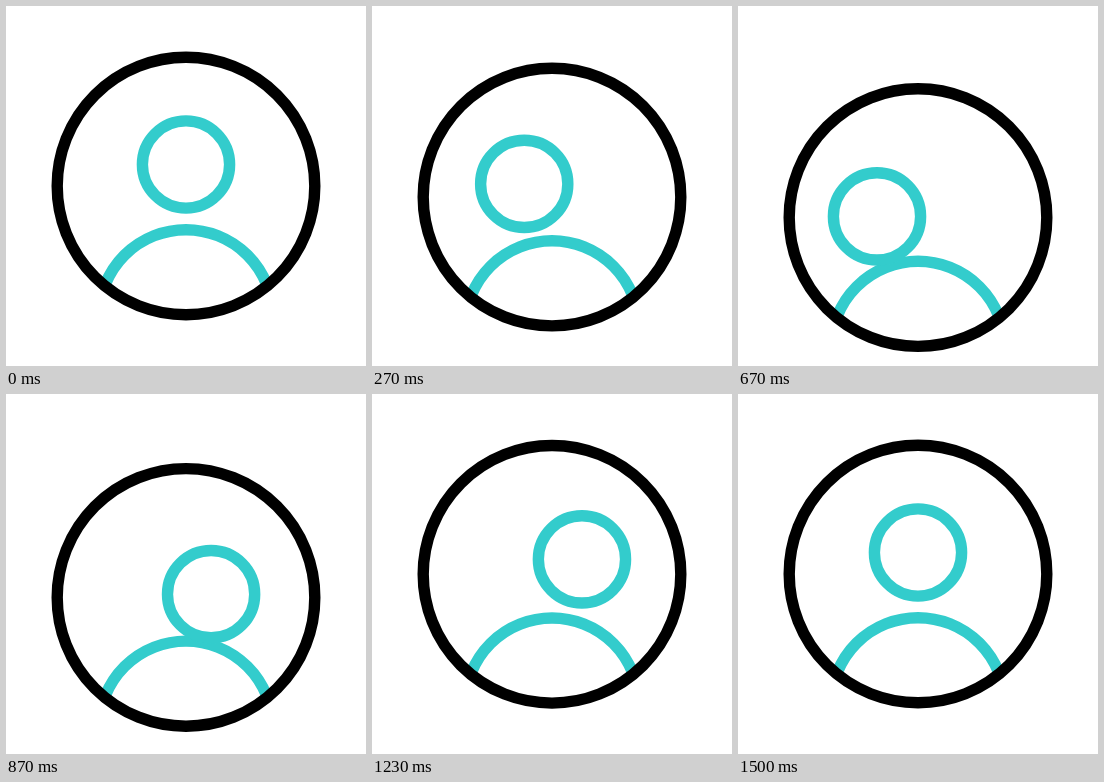
Write an HTML page that moves like this. It is 360 px wide and 360 px high and loops after 2 s.

```html
<!DOCTYPE html>
<html lang="en">
<head>
<meta charset="utf-8">
<title>Avatar</title>
<style>
  html, body { margin: 0; width: 100%; height: 100%; overflow: hidden; background: #fff; }
  svg { display: block; width: 100%; height: 100%; }
  circle { fill: none; stroke-width: 11.4; }
  .teal { stroke: #33cccc; }
  .ring { stroke: #000; }
</style>
</head>
<body>
<svg viewBox="0 0 360 360">
  <clipPath id="disc"><circle cx="180" cy="180" r="128"/></clipPath>
  <g id="badge">
    <g clip-path="url(#disc)"><circle class="teal" cx="180" cy="310.6" r="86.9"/></g>
    <circle class="teal" id="head" cx="180" cy="158.5" r="43.6"/>
    <circle class="ring" cx="180" cy="180" r="128.8"/>
  </g>
</svg>
<script>
  const LOOP = 2000, FPS = 30;
  const badge = document.getElementById('badge');
  const head = document.getElementById('head');

  // Eased progress of k between a and b
  function ease(k, a, b) {
    const p = Math.min(1, Math.max(0, (k - a) / (b - a)));
    return p * p * (3 - 2 * p);
  }

  const mix = (a, b, s) => a + (b - a) * s;

  // Head offset inside the badge: out left, sagging swing right, back home
  const LEFT = [-58.2, 17.4], RIGHT = [51.9, 11.4], SAG = 7.3;
  function headOffset(k) {
    if (k < 16.5) {
      const s = ease(k, 0, 16.5);
      return [LEFT[0] * s, LEFT[1] * s];
    }
    if (k < 30.5) {
      const s = ease(k, 16.5, 30.5);
      return [mix(LEFT[0], RIGHT[0], s), mix(LEFT[1], RIGHT[1], s) + 4 * SAG * s * (1 - s)];
    }
    const s = 1 - ease(k, 30.5, 45);
    return [RIGHT[0] * s, RIGHT[1] * s];
  }

  function draw(ms) {
    // Step at 30 pictures a second, with times rounded to 10 ms
    const k = Math.floor((ms % LOOP + 3.4) * FPS / 1000) % 60;
    const drop = 31.6 * (ease(k, 0, 20) - ease(k, 20, 38));
    const [x, y] = headOffset(k);
    badge.setAttribute('transform', `translate(0 ${drop.toFixed(2)})`);
    head.setAttribute('transform', `translate(${x.toFixed(2)} ${y.toFixed(2)})`);
  }

  const start = performance.now();
  function tick() {
    draw(performance.now() - start);
    requestAnimationFrame(tick);
  }
  draw(0);
  requestAnimationFrame(tick);
</script>
</body>
</html>
```
